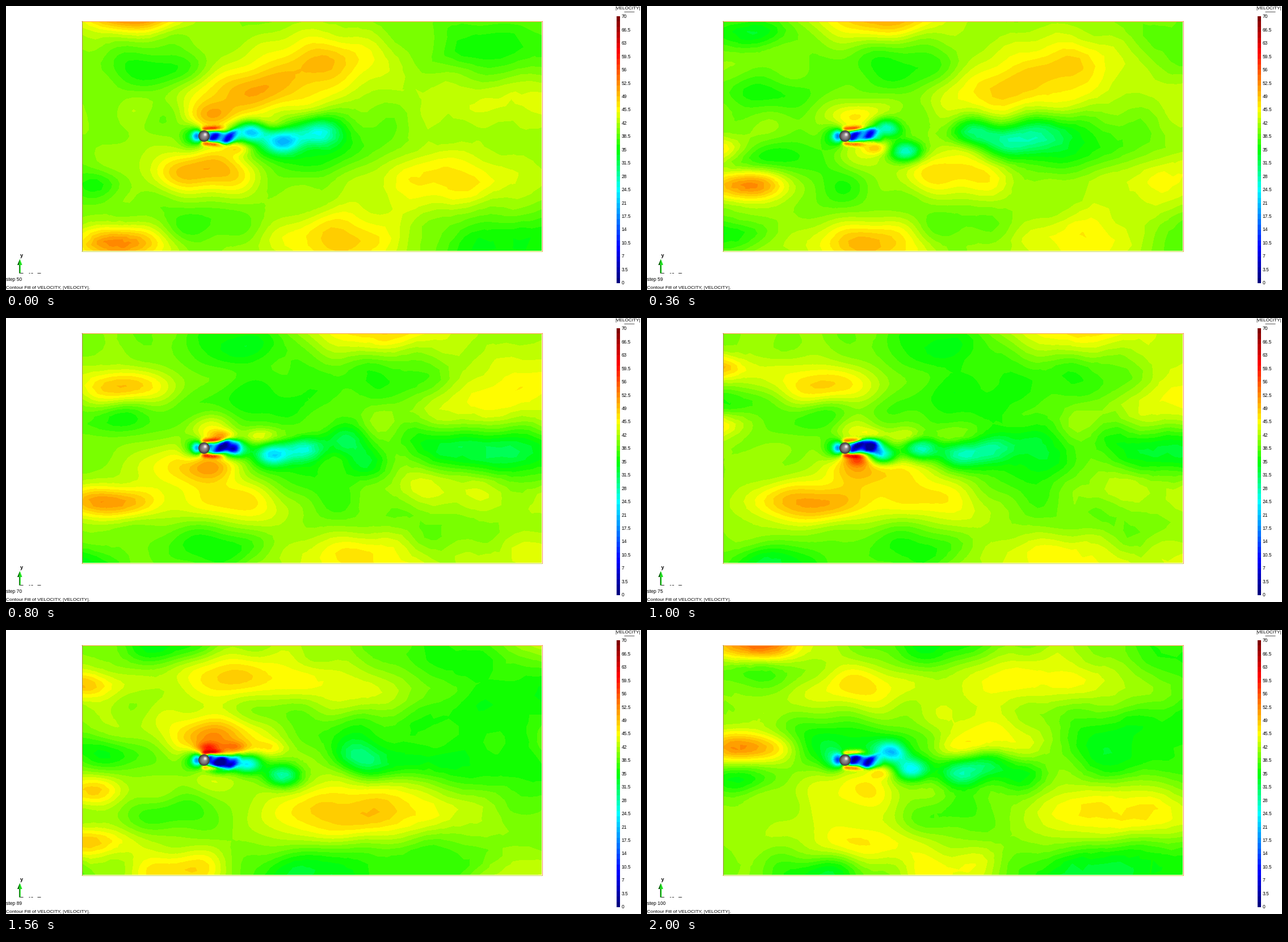
Recreate the animation shown at these times as a matplotlib script. Size 1119 px wide and 500 px high, loop 2040 ms.

```python
import numpy as np
import matplotlib.pyplot as plt
from matplotlib.animation import FuncAnimation
from matplotlib.colors import LinearSegmentedColormap
from matplotlib.patches import Circle, Polygon
from matplotlib.tri import Triangulation

W, H, DPI = 1119, 500, 64
LEFT, RIGHT, TOP, BOTTOM = 134, 944, 27, 431
CX, CY, RADIUS = 349, 229, 10
FIRST_STEP, FRAMES = 50, 51
BANDS, VMAX = 50, 70
DRIFT, SHED_DRIFT = 21.5, 16

# Gusts and lulls: x at the first step, y, strength at the inlet
EDDIES = np.array([
    (218, 14, 16), (564, 98, 14), (200, 418, 14), (590, 412, 15),
    (787, 300, 16), (940, 172, 11), (350, 287, 14), (436, 160, 14),
    (-15, 316, 13), (-94, 253, 10), (-254, 324, 13), (-225, 120, 10),
    (-433, 87, 11), (-461, 188, 13), (-523, 425, 9), (-715, 97, 8),
    (-697, 283, 7), (-698, 372, 8), (-903, 206, 13), (-880, 26, 15),
    (262, 112, -5.5), (907, 75, -5), (930, 418, -6), (522, 230, -7),
    (359, 382, -3.5), (163, 315, -4), (-13, 45, -6.5), (12, 155, -5),
    (27, 265, -5.5), (-65, 400, -5.5), (-226, 180, -4.5), (-316, 432, -8),
    (-393, 148, -4.5), (-538, 323, -4.5), (-560, 26, -7), (-648, 222, -6),
    (-763, 200, -6), (-763, 428, -8), (-865, 75, -5.5), (-920, 262, -6),
])
# Vortices: step of shedding, sideways offset
SHED = np.array([
    (38, -6), (42, 10), (45.6, -8), (53, 27), (55, -16), (59.6, 1),
    (63.2, 11), (67.4, 2), (71.6, 14), (73, -14), (81, 27), (85, 6),
    (88, 24), (93.4, 16), (95.4, -16),
])

rng = np.random.default_rng(7)
WAVES = np.column_stack([rng.uniform(.02, .07, 10), rng.uniform(-.09, .09, 10),
                         rng.uniform(0, 6.3, 10)])

CMAP = LinearSegmentedColormap.from_list("speed", [
    (0, "#000080"), (.125, "#0000ff"), (.35, "#00ffff"), (.5, "#00ff00"),
    (.65, "#ffff00"), (.875, "#ff0000"), (1, "#800000")], N=BANDS)
LUT = (CMAP(np.arange(BANDS))[:, :3] * 255).round().astype(np.uint8)


def ramp(v, a, b):
    t = np.clip((v - a) / (b - a), 0, 1)
    return t * t * (3 - 2 * t)


def bumps(x, y, cx, cy, sx, sy, amp):
    """Sum of Gaussian bumps at the points x, y."""
    u = (x[:, None] - cx) / sx
    v = (y[:, None] - cy) / sy
    return np.exp(-.5 * (u * u + v * v)) @ amp


def stream(x, y, step):
    """Eddies that widen and fade while the free stream carries them."""
    x0, y0, amp = EDDIES.T
    px = x0 + DRIFT * (step - FIRST_STEP)
    off = y0 - CY
    py = y0 + 18 * np.sign(off) * np.exp(-np.abs(off) / 60) * ramp(px, 150, 470)
    run = px - LEFT
    sx = np.clip(52 + .09 * run, 45, 105)
    sy = np.clip(17 + .05 * run, 15, 36)
    fade = np.where(amp > 0, np.exp(-.0013 * np.clip(run, 0, 900)), 1)
    px = np.where(px > 720, 720 + .75 * (px - 720), px)
    return bumps(x, y, px, py, sx, sy, amp * fade)


def wake(x, y, step):
    """Slow vortices, each with a fast jet on its other side."""
    born, off = SHED.T
    age = step - born
    px = 360 + SHED_DRIFT * age
    near = np.clip((px - CX) / 75, 0, 1)
    on = ramp(px, 352, 375)
    old = np.clip(age, 0, 30)
    v = bumps(x, y, px, CY + off * near, 15 + .95 * old, 9 + .65 * old,
              -19 * on * np.exp(-.065 * np.maximum(age - 4, 0)))
    v += bumps(x, y, px - 20, CY - 21 * np.sign(off), 13 + old, 6 + .5 * old,
               12 * on * np.exp(-.13 * old))
    return v


def near_field(x, y, step):
    dx, dy = x - CX, y - CY
    side = np.abs(dy)
    v = -20 * np.exp(-((dx + 12) / 9) ** 2 - (dy / 10) ** 2)
    v -= 7 * np.exp(-((dx + 22) / 18) ** 2 - (dy / 20) ** 2)

    mid = 4 * np.sin((dx - SHED_DRIFT * step) / 14) * np.clip(dx / 40, 0, 1)
    core = np.exp(-((dy - mid) / (9 + .04 * dx)) ** 4)
    core *= ramp(dx, 0, 12) * (1 - ramp(dx, 38, 72))
    v += core * (-29 + 7 * np.sin(dx / 4.5 + dy / 6 - 2 * step))

    sheet = np.exp(-((side - 13 - .06 * dx) / 3.8) ** 2)
    v += 13 * sheet * ramp(dx, -9, 2) * (1 - ramp(dx, 15, 45))
    upper = 8 - .12 * (step - FIRST_STEP)
    lower = 2 + 4 * np.exp(-((step - 72) / 6) ** 2)
    for amp, sign in ((upper, -1), (lower, 1)):
        v += amp * np.exp(-((dx - 18) / 42) ** 2 - ((dy - sign * 34) / 26) ** 2)
    return v


def speed(x, y, step):
    v = 40.3 + .8 * ramp(step, 68, 82) + near_field(x, y, step)
    v += stream(x, y, step) + wake(x, y, step)
    for kx, ky, phase in WAVES:
        v += .2 * np.sin(kx * (x - DRIFT * step) + ky * y + phase)
    return np.clip(v, 1.5, VMAX - 1)


def make_mesh():
    """Rings of nodes that grow coarser away from the sphere."""
    pts, r = [], 6.0
    while r < 640:
        h = min(1.8 + .045 * r, 22)
        n = int(2 * np.pi * r / h)
        a = (np.arange(n) + rng.random()) * 2 * np.pi / n
        ring = np.column_stack([CX + r * np.cos(a), CY + r * np.sin(a)])
        ring += rng.uniform(-.24, .24, ring.shape) * h
        gap = .4 * h
        ok = ((ring[:, 0] > LEFT + gap) & (ring[:, 0] < RIGHT - gap)
              & (ring[:, 1] > TOP + gap) & (ring[:, 1] < BOTTOM - gap))
        pts.append(ring[ok])
        r += h
    xs = np.linspace(LEFT - 1, RIGHT + 1, 56)
    ys = np.linspace(TOP - 1, BOTTOM + 1, 28)
    for edge in (ys[0], ys[-1]):
        pts.append(np.column_stack([xs, np.full_like(xs, edge)]))
    for edge in (xs[0], xs[-1]):
        pts.append(np.column_stack([np.full(len(ys) - 2, edge), ys[1:-1]]))
    return np.vstack(pts)


NX, NY = make_mesh().T
tri = Triangulation(NX, NY)
gx, gy = np.meshgrid(np.arange(LEFT, RIGHT) + .5, np.arange(TOP, BOTTOM) + .5)
corners = tri.triangles[tri.get_trifinder()(gx.ravel(), gy.ravel())]
IA, IB, IC = corners.T
ux, uy = NX[IA] - NX[IC], NY[IA] - NY[IC]
vx, vy = NX[IB] - NX[IC], NY[IB] - NY[IC]
qx, qy = gx.ravel() - NX[IC], gy.ravel() - NY[IC]
det = ux * vy - vx * uy
WA = (qx * vy - vx * qy) / det
WB = (ux * qy - qx * uy) / det


def render(step):
    z = speed(NX, NY, step)
    v = WA * z[IA] + WB * z[IB] + (1 - WA - WB) * z[IC]
    band = np.clip(v * BANDS / VMAX, 0, BANDS - 1).astype(int)
    return LUT[band].reshape(gx.shape + (3,))


fig = plt.figure(figsize=(W / DPI, H / DPI), dpi=DPI, facecolor="white")
ax = fig.add_axes([0, 0, 1, 1])


def image(data, box, z=1):
    return ax.imshow(data, extent=box, aspect="auto", zorder=z,
                     interpolation="nearest", origin="upper")


def line(x0, y0, x1, y1, color, px=1):
    ax.plot([x0, x1], [y0, y1], color=color, lw=px * 72 / DPI, zorder=3,
            solid_capstyle="butt")


def label(x, y, s, px=8.5, **kw):
    return ax.text(x, y, s, fontsize=px * 72 / DPI, family="Liberation Sans",
                   color="black", va="baseline", **kw)


field = image(render(FIRST_STEP), (LEFT, RIGHT, BOTTOM, TOP))
line(133, 26.5, 945, 26.5, "#ffa040")
line(944.5, 26, 944.5, 432, "#ff9050")
line(133.5, 26, 133.5, 432, "#a08c40")
line(133, 431.5, 945, 431.5, "#c8d840")

# Shaded sphere
s = np.linspace(-1, 1, 44)
sx, sy = np.meshgrid(s, s)
shade = 150 - 95 * (sx ** 2 + sy ** 2)
shade += 110 * np.exp(-((sx - .22) ** 2 + (sy + .3) ** 2) / .09)
shade = np.clip(shade, 45, 240)
ball = image(np.dstack([shade, shade * .96, shade * .98]).astype(np.uint8),
             (CX - RADIUS, CX + RADIUS, CY + RADIUS, CY - RADIUS), 4)
ball.set_clip_path(Circle((CX, CY), RADIUS, transform=ax.transData))

# Colour scale
image(LUT[::-1, None, :], (1076, 1082, 488, 18))
for i in range(21):
    label(1084.5, 21.3 + 23.45 * i, f"{VMAX - 3.5 * i:g}")
label(1073.5, 6, "|VELOCITY|", 8.3)
line(1089, 9.5, 1107, 9.5, "#555555")

# Axis marker
line(24, 470, 24, 454, "#20d020", 2.5)
line(22.5, 470, 22.5, 455, "#106010")
for right, color, z in ((28.5, "#20e020", 4), (22.5, "#0c500c", 5)):
    ax.add_patch(Polygon([(20, 456), (right, 456), (24.5, 445.5)],
                         fc=color, ec="none", zorder=z))
for a, b in ((24, 30), (40, 42), (44, 47), (55, 61)):
    line(a, 469.5, b, 469.5, "#303030")
label(24.5, 442.5, "y", 9, weight="bold")

counter = label(-.5, 484, f"step {FIRST_STEP}")
label(-.5, 498, "Contour Fill of VELOCITY, |VELOCITY|.", 8.4)

ax.set_xlim(0, W)
ax.set_ylim(H, 0)
ax.axis("off")


def update(i):
    step = FIRST_STEP + i
    field.set_data(render(step))
    counter.set_text(f"step {step}")
    return field, counter


anim = FuncAnimation(fig, update, frames=FRAMES, interval=40, repeat=True,
                     repeat_delay=0, blit=False)
plt.show()
```
